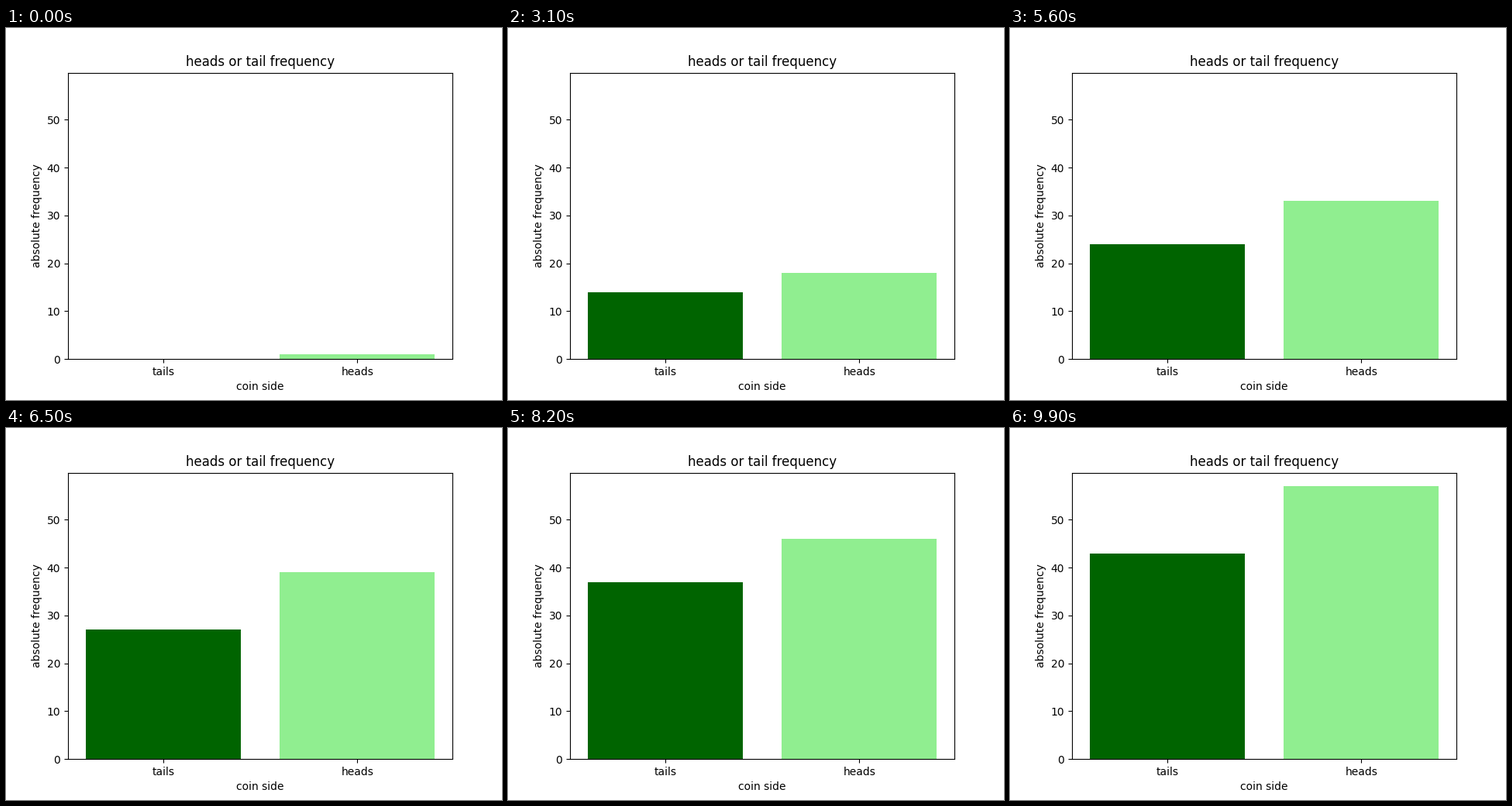
A matplotlib script for the animation above (10000 ms loop, 640 px wide and 480 px high).

```python
import numpy as np
import matplotlib.pyplot as plt
from matplotlib.animation import FuncAnimation

FLIPS = 100

# Tails grow at a steady rate between a few turns of luck; heads are the rest.
turns = [(0, 0), (31, 14), (33, 16), (66, 27), (88, 40.4), (99, 43)]
toss = np.arange(FLIPS)
tails = np.rint(np.interp(toss, *zip(*turns))).astype(int)
heads = toss + 1 - tails

fig, ax = plt.subplots(figsize=(6.4, 4.8), dpi=100)
bars = ax.bar(["tails", "heads"], [tails[-1], heads[-1]],
              color=["darkgreen", "lightgreen"])
ax.set_xlim(-0.49, 1.49)
ax.set_ylim(0, heads[-1] * 1.05)
ax.set_title("heads or tail frequency")
ax.set_xlabel("coin side")
ax.set_ylabel("absolute frequency")


def update(i):
    for bar, height in zip(bars, (tails[i], heads[i])):
        bar.set_height(height)
    return list(bars)


anim = FuncAnimation(fig, update, frames=FLIPS, interval=100, repeat=True)
plt.show()
```
